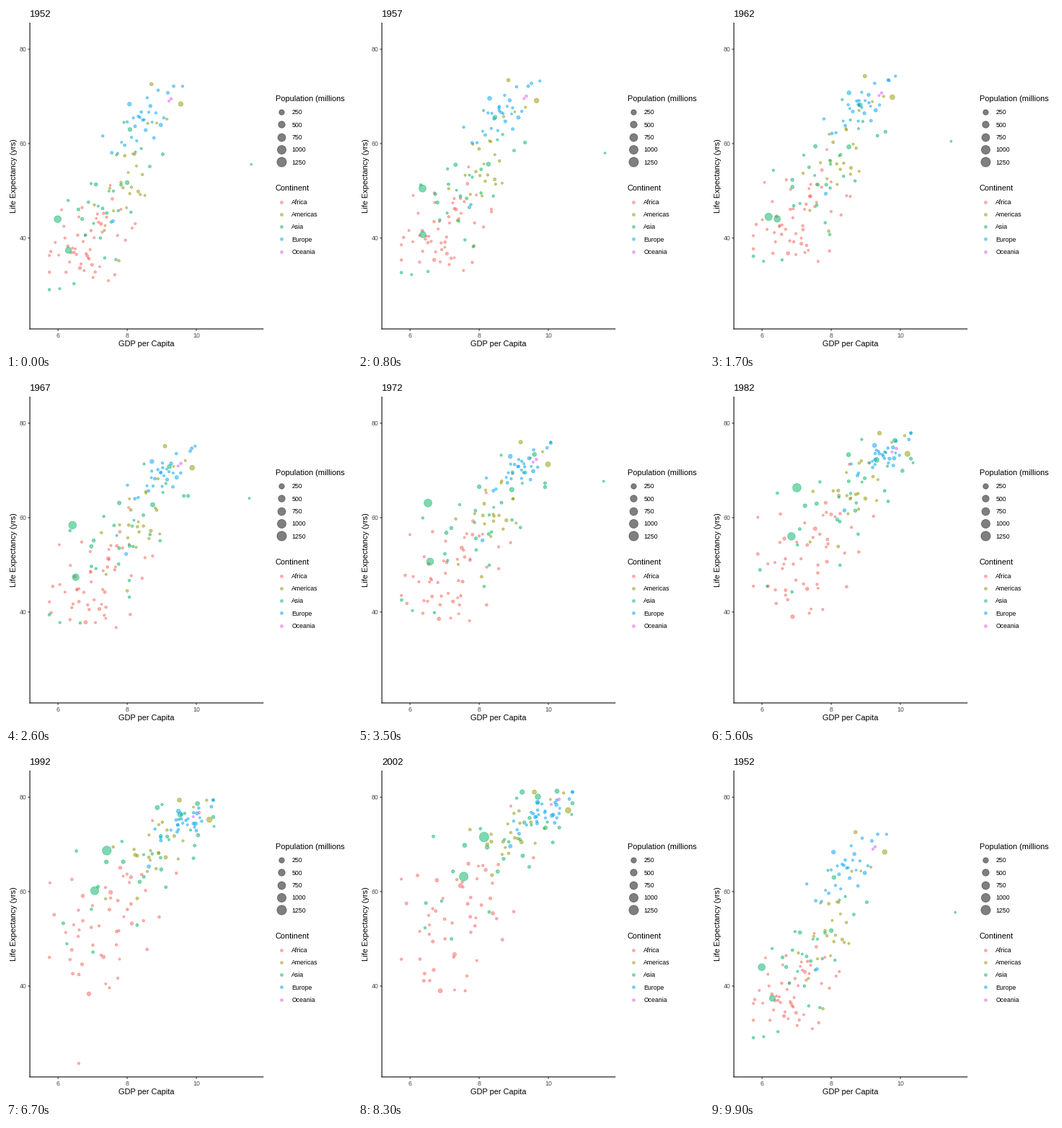
A matplotlib script for the animation above (10 s loop, 480x480 px).

```python
import numpy as np
import matplotlib.pyplot as plt
from matplotlib.animation import FuncAnimation

SIZE = 480
YEARS = np.arange(1952, 2008, 5)
AGE = YEARS - 1952
FRAMES = 100
STARTS = [5, 14, 23, 32, 41, 49, 56, 64, 72, 80, 88, 96]
LEFT, BOTTOM = 33.1, 448.0
EDGE = 0.71

plt.rcParams["font.family"] = "Liberation Sans"
rng = np.random.default_rng(52)


class Region:
    """A cloud of countries; each statistic is given for 1952, 1982 and 2007."""

    def __init__(self, name, color, count, link, pop, growth, gdp, gdp_sd, life, life_sd):
        self.name, self.color, self.count = name, color, count
        self.link, self.pop, self.growth = link, pop, growth
        self.stats = [curve(v) for v in (gdp, gdp_sd, life, life_sd)]


def curve(values):
    return np.polyval(np.polyfit([0, 30, 55], values, 2), AGE)


def spread(n):
    """Evenly filled bell shape in random order."""
    p = (rng.permutation(n) + 0.5) / n
    return np.clip(0.56 * np.log(p / (1 - p)), -2.1, 2.1)[:, None]


def drift(n):
    """Standing of each country, slowly changing over the years."""
    angle = 0.6 * AGE / 55
    return spread(n) * np.cos(angle) + spread(n) * np.sin(angle)


def cloud_paths(region):
    n, r = region.count, region.link
    gdp, gdp_sd, life, life_sd = region.stats
    wealth = drift(n)
    health = r * wealth + np.sqrt(1 - r * r) * drift(n)
    x = np.clip(gdp + gdp_sd * wealth, 5.75, 9.65 + 0.021 * AGE)
    y = np.clip(life + life_sd * health, 29 + 0.2 * AGE, 72.6 + 0.17 * AGE)
    pop = region.pop * np.exp(1.15 * spread(n)) * region.growth ** (AGE / 50)
    return x, y, pop


def lone_path(pop, growth, knots):
    """Path through a few (year, log gdp, life) points."""
    t, x, y = zip(*knots)
    return np.interp(YEARS, t, x), np.interp(YEARS, t, y), pop * growth ** (AGE / 50)


REGIONS = [
    Region("Africa", "#F6635A", 51, 0.4, 3.2, 3.2,
           (6.87, 7.3, 7.4), (0.65, 0.85, 0.97), (39.1, 51.6, 54.8), (5.2, 7.5, 9.6)),
    Region("Americas", "#949600", 24, 0.72, 4, 2.8,
           (8.1, 8.7, 9.0), (0.5, 0.62, 0.68), (53.3, 66.2, 73.6), (9.3, 6.7, 4.4)),
    Region("Asia", "#00B366", 29, 0.72, 8, 3,
           (7.35, 8.3, 8.8), (0.8, 1.2, 1.25), (46.3, 62.6, 70.7), (9.3, 8.5, 8)),
    Region("Europe", "#00A2F4", 29, 0.8, 8, 1.3,
           (8.45, 9.5, 10), (0.55, 0.5, 0.58), (65, 73, 77.6), (4.8, 2.6, 2.8)),
    Region("Oceania", "#E258F2", 2, 0.9, 4, 2.1,
           (9.24, 9.8, 10.3), (0.05, 0.08, 0.15), (69.25, 74, 80.5), (0.3, 0.4, 0.7)),
]

# Region, population in 1952, its growth in fifty years, key points
LONE = [
    (0, 2.5, 3, [(1952, 6.2, 40), (1987, 6.74, 44), (1992, 6.6, 23.6),
                 (1997, 6.38, 36.1), (2007, 6.76, 46.2)]),
    (1, 158, 1.82, [(1952, 9.55, 68.4), (1972, 9.99, 71.3), (2007, 10.67, 78.2)]),
    (2, 556, 2.3, [(1952, 5.99, 44), (1957, 6.36, 50.5), (1962, 6.19, 44.5),
                   (1967, 6.42, 58.4), (1972, 6.52, 63.1), (1982, 6.95, 66),
                   (1992, 7.41, 68.7), (2007, 8.51, 73)]),
    (2, 372, 2.8, [(1952, 6.3, 37.4), (1972, 6.58, 50.7), (1992, 7.06, 60.2),
                   (2007, 7.8, 64.7)]),
    (2, 86, 1.47, [(1952, 8.08, 63), (1972, 9.6, 73.4), (2007, 10.36, 82.6)]),
    (2, 0.2, 13, [(1952, 11.59, 55.6), (1957, 11.64, 58), (1962, 11.47, 60.5),
                  (1972, 11.6, 67.7), (1982, 10.35, 71.3), (2007, 10.76, 77.6)]),
    (3, 22, 3, [(1952, 7.59, 43.6), (1982, 8.35, 61), (2007, 9.04, 71.8)]),
]


def px(x):
    return 72.2 + 47.95 * (x - 6)


def py(y):
    return 321.9 - 6.548 * (y - 40)


def pop_size(millions):
    return 1 + 5 * np.sqrt(np.clip((millions - 0.06) / 1318.6, 0, 1))


def diameter(size):
    return 0.75 * (size * 2.845 + 0.945)


paths, colors = [], []
for region in REGIONS:
    paths += list(zip(*cloud_paths(region)))
    colors += [region.color] * region.count
for k, pop, growth, knots in LONE:
    paths.append(lone_path(pop, growth, knots))
    colors.append(REGIONS[k].color)

X, Y, P = np.array(paths).transpose(1, 0, 2)
X, Y, S = px(X), py(Y), pop_size(P)

fig = plt.figure(figsize=(SIZE / 72, SIZE / 72), dpi=72, facecolor="white")
ax = fig.add_axes([0, 0, 1, 1])
ax.set(xlim=(0, SIZE), ylim=(SIZE, 0))
ax.axis("off")


def text(x, y, s, size=11, color="black", **kw):
    return ax.text(x, y, s, fontsize=size, color=color, **kw)


def line(x, y, color="black"):
    ax.plot(x, y, color=color, lw=1.07, solid_capstyle="butt", snap=False)


def dots(x, y, size, color):
    return ax.scatter(x, y, s=diameter(size) ** 2, c=color, alpha=0.5,
                      linewidths=EDGE, zorder=3)


def legend(heading, top, rows):
    text(373.5, top, heading)
    for i, (label, size, color) in enumerate(rows):
        y = top + 15.4 + 17.28 * i
        dots([382.2], [y], size, color)
        text(396.3, y + 3.2, label, 8.8)


for v in (6, 8, 10):
    line([px(v)] * 2, [BOTTOM, BOTTOM + 2.8], "#333333")
    text(px(v), 460.4, str(v), 8.8, "#4D4D4D", ha="center")
for v in (40, 60, 80):
    line([LEFT - 2.8, LEFT], [py(v)] * 2, "#333333")
    text(28.4, py(v) + 3.2, str(v), 8.8, "#4D4D4D", ha="right")
line([LEFT, LEFT], [23, BOTTOM + 0.5])
line([LEFT - 0.5, 357.3], [BOTTOM, BOTTOM])
text(195.2, 472.5, "GDP per Capita", ha="center")
text(15.9, 235.7, "Life Expectancy (yrs)", rotation=90, ha="right", va="center")

legend("Population (millions", 131.8,
       [(str(p), pop_size(p), "black") for p in range(250, 1251, 250)])
legend("Continent", 256.2, [(r.name, 1.5, r.color) for r in REGIONS])

title = text(33.2, 15.2, "", 13.2)
cloud = dots(X[:, 0], Y[:, 0], S[:, 0], colors)


def progress(frame):
    """Current state, next state and the share of the way between them."""
    k = sum(frame >= s for s in STARTS) - 1
    if k < 0:
        return 0, 1, 0.0
    steps = 3 if k == 5 else 4
    return k, (k + 1) % len(YEARS), min((frame - STARTS[k] + 1) / steps, 1.0)


def update(frame):
    a, b, t = progress(frame)
    x, y, s = (m[:, a] * (1 - t) + m[:, b] * t for m in (X, Y, S))
    cloud.set_offsets(np.column_stack([x, y]))
    cloud.set_sizes(diameter(s) ** 2)
    title.set_text(str(YEARS[b if t > 0.5 else a]))
    return cloud, title


anim = FuncAnimation(fig, update, frames=FRAMES, interval=100, repeat=True)
plt.show()
```
